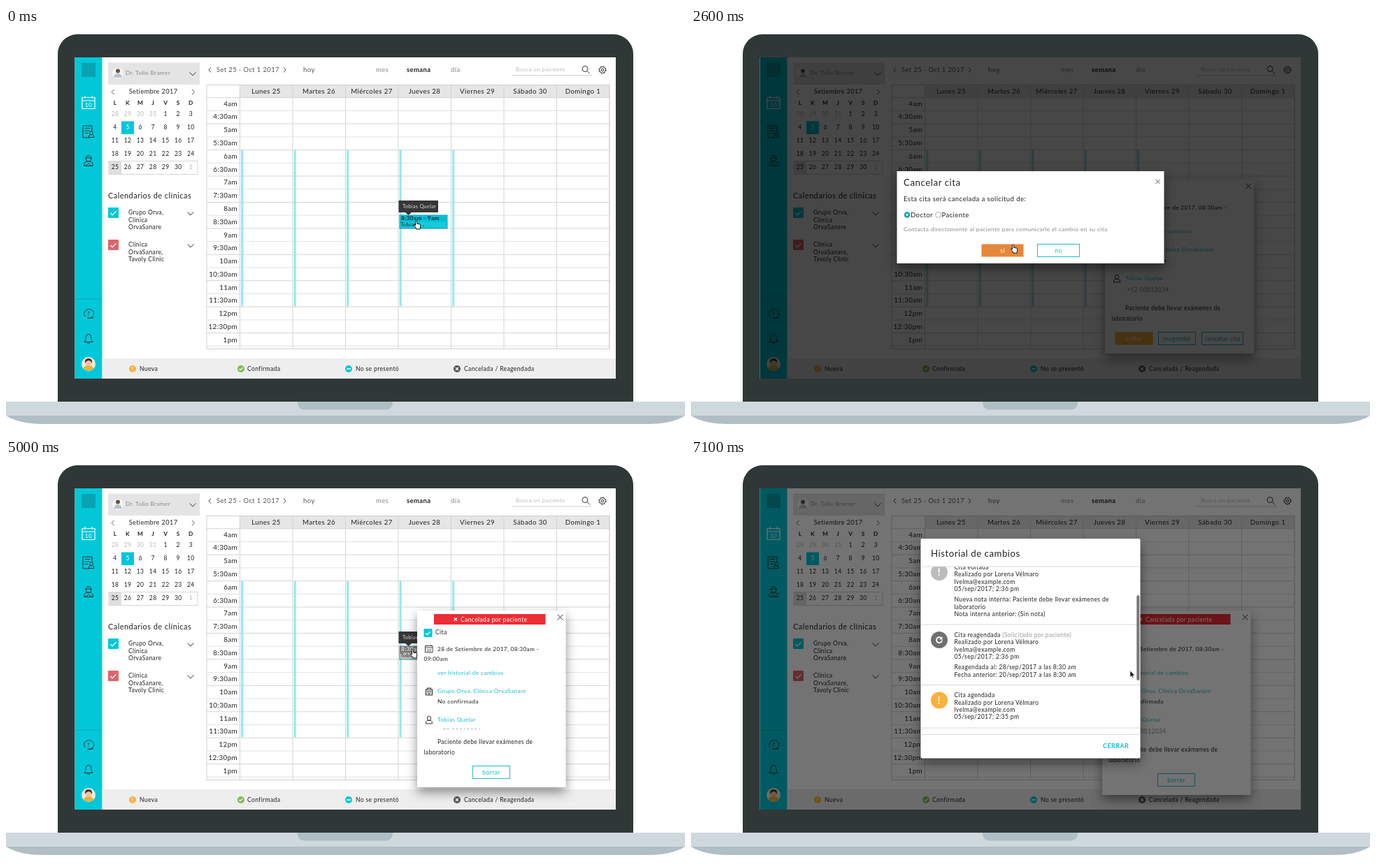
Recreate the animation shown at these times as an HTML page. Size 971x577 px, loop 8.1 s.

```html
<!DOCTYPE html>
<html lang="es">
<head>
<meta charset="utf-8">
<title>Agenda</title>
<style>
html, body { margin: 0; width: 100%; height: 100%; overflow: hidden; background: #fff; }
svg { display: block; width: 100%; height: 100%; }
text { font-family: Lato, "Open Sans", sans-serif; letter-spacing: .04em; fill: #222; white-space: pre; }
.m { text-anchor: middle; }
.e { text-anchor: end; }
.b { font-weight: 700; }
.c { fill: #1cbccb; }
.g { fill: #888; }
.l { fill: #bbb; }
.w { fill: #fff; }
.line { fill: none; stroke: #333; stroke-width: 1; }
.shadow { filter: drop-shadow(0 7px 8px rgba(0,0,0,.44)); }
</style>
</head>
<body>
<svg id="stage" viewBox="0 0 971 577"></svg>
<script>
const TEAL = '#00c8d9', ORANGE = '#fbb03b', DARK = '#333';
const PATIENT = 'Tobias Quelar', PHONE = '+52 00012034';
const STAFF = 'Lorena Vélmaro', MAIL = 'lvelma@example.com';

const text = (x, y, s, size = 8.6, cls = '', more = '') =>
  `<text x="${x}" y="${y}" font-size="${size}" class="${cls}" ${more}>${s}</text>`;
const rect = (x, y, w, h, fill, more = '') =>
  `<rect x="${x}" y="${y}" width="${w}" height="${h}" fill="${fill}" ${more}/>`;
const path = (d, stroke = DARK, width = 1, more = '') =>
  `<path d="${d}" fill="none" stroke="${stroke}" stroke-width="${width}" ${more}/>`;
const shape = (d, fill) => `<path d="${d}" fill="${fill}"/>`;
const disc = (x, y, r, fill, more = '') => `<circle cx="${x}" cy="${y}" r="${r}" fill="${fill}" ${more}/>`;
const group = (id, body, more = '') => `<g id="${id}" ${more}>${body}</g>`;
const range = n => [...Array(n).keys()];

const chevron = (x, y) => path(`M${x - 4.5},${y - 2.5}l4.5,4.5 4.5,-4.5`);
const cross = (x, y, r, stroke = DARK, width = 1) =>
  path(`M${x - r},${y - r}l${2 * r},${2 * r}m0,${-2 * r}l${-2 * r},${2 * r}`, stroke, width);
const tick = (x, y, k, width = 1.3) =>
  path(`M${x - 3 * k},${y}l${2 * k},${2 * k} ${4 * k},${-4 * k}`, '#fff', width);
const check = (x, y, size, fill) =>
  rect(x, y, size, size, fill, 'rx="1"') + tick(x + size / 2, y + size / 2 + .5, size / 11);
const button = (x, y, w, h, label, fill) =>
  rect(x, y, w, h, fill || '#fff', fill ? '' : 'stroke="#1cbccb"') +
  text(x + w / 2, y + h / 2 + 3.2, label, 8.6, fill ? 'm w' : 'm c');
const person = (x, y, s = 1, stroke = DARK) => path(
  `M${x - 3 * s},${y - 2.5 * s}a${3 * s},${3.4 * s} 0 1 1 ${6 * s},0a${3 * s},${3.4 * s} 0 1 1 ${-6 * s},0` +
  `M${x - 5 * s},${y + 6 * s}q0,${-5 * s} ${3 * s},${-5 * s}h${4 * s}q${3 * s},0 ${3 * s},${5 * s}z`, stroke);

function laptop() {
  return shape('M74,535V37A28,28 0 0 1 102,9H869A28,28 0 0 1 897,37V535Z', '#303837') +
    rect(0, 535, 971, 20, '#cfd8dd') +
    shape('M0,555H971Q952,567 918,567H53Q19,567 0,555Z', '#b0bec5') +
    shape('M417,535H553Q553,546.5 542,546.5H428Q417,546.5 417,535Z', '#b0bec5') +
    rect(98.5, 42, 773.5, 460, '#fff');
}

function sidebar() {
  return rect(98.5, 42, 39, 460, TEAL) + rect(108, 50, 20, 20, '#08a2b0') +
    path('M109,99.5h18v16h-18zM109,104h18M113,97v4M123,97v4', '#fff', 1.2) +
    text(118, 113.3, '10', 8, 'm w') +
    path('M119,157h-9v-17h13v7M112.500,143.500h8M112.500,147h7M112.500,150.500h5') + person(122, 152, .75) +
    person(118, 190, 1.25) + path('M113,187q5,-3 10,0M114,197l4,-3 4,3') +
    path('M99,388H137', '#0599a6', 1, 'stroke-dasharray="2 1"') +
    path('M113.500,413.500a7,6.500 0 1 1 3,1.800h8l-2,-2') + text(118, 412, '?', 8, 'm') +
    path('M112,449.500q2,-2 2,-5 0,-6 4,-6t4,6q0,3 2,5zM116,451q2,2 4,0') +
    disc(118, 481, 10, '#f3ead9') + shape('M111,488q1,-5 7,-5t7,5q-7,5 -14,0', '#e8b23a') +
    disc(118, 479.5, 4.5, '#f3c3a0') +
    shape('M113,480q-1,-7 5,-7t5,7q-1,-3 -4,-4 -4,0 -6,4', '#463029');
}

function monthPanel() {
  const colX = i => 156 + 18.05 * i, rowY = r => 126.3 + 18.8 * r;
  let out = rect(146, 49.5, 131, 31.5, '#e4e4e4') + disc(160, 65, 8, '#f4f4f4') +
    disc(160, 61.5, 3, '#6b5548') + shape('M154.500,71q0,-6 5.500,-6t5.500,6z', '#b9c4cb') +
    text(171, 67.3, 'Dr. Tulio Bramer', 8.3, 'g') + chevron(267, 66) +
    path('M154.500,88l-3.500,3.500 3.500,3.500M266,88l3.500,3.500 -3.500,3.500', '#555') +
    text(210.5, 94, 'Setiembre 2017', 9.2, 'm') +
    rect(165, 133.5, 18, 18.5, TEAL) +
    rect(147, 190.5, 127, 19, '#fff', 'stroke="#d5d5d5"') + rect(147, 190.5, 18, 19, '#dedede');
  range(7).forEach(i => out += text(colX(i), 110, 'LKMJVSD'[i], 8.3, 'm b'));
  range(35).forEach(i => {
    const day = i < 4 ? 28 + i : i === 34 ? 1 : i - 3;
    const cls = i < 4 || i === 34 ? 'm l' : day === 5 ? 'm w' : 'm';
    out += text(colX(i % 7), rowY(Math.floor(i / 7)), day, 8.6, cls);
  });
  out += text(146, 244, 'Calendarios de clínicas', 11);
  [['Grupo Orva,', 'Clínica', 'OrvaSanare'], ['Clínica', 'OrvaSanare,', 'Tavoly Clinic']].forEach((lines, i) => {
    const y = 46 * i;
    out += check(146, 257 + y, 15, i ? '#e06469' : TEAL) + chevron(264, 266 + y);
    lines.forEach((s, j) => out += text(175, 267.3 + y + 10.3 * j, s));
  });
  return out;
}

function weekGrid() {
  const colX = i => 334.5 + 75.5 * i, rowY = i => 99.7 + 18.72 * i;
  let out = path('M293,56.500l-3,3.500 3,3.500M397,56.500l3,3.500 -3,3.500', '#444') +
    text(301, 63.2, 'Set 25 - Oct 1 2017', 9.45, '', 'style="fill:#555"') + text(425, 63.2, 'hoy', 9.6, '', 'style="fill:#555"') +
    text(529, 63.2, 'mes', 9.6, 'g') + text(573, 63.2, 'semana', 9.5, 'b') + text(636, 63.2, 'día', 9.6, 'g') +
    text(729, 61.5, 'Busca un paciente', 8.2, 'l') + path('M723,68H838', '#ccc') +
    '<circle class="line" cx="828" cy="58.500" r="4"/>' + path('M831,61.500l4,4') +
    '<circle class="line" cx="853" cy="60" r="4.300"/><circle class="line" cx="853" cy="60" r="1.800"/>' +
    '<circle class="line" cx="853" cy="60" r="5.200" stroke-dasharray="2 2.080"/>' +
    rect(334.5, 81, 528.5, 19, '#e6e6e6');
  ['Lunes 25', 'Martes 26', 'Miércoles 27', 'Jueves 28', 'Viernes 29', 'Sábado 30', 'Domingo 1']
    .forEach((s, i) => out += text(colX(i) + 37.5, 93.5, s, 9.7, 'm'));
  range(20).forEach(i => out += path(`M287,${rowY(i)}H863`, i % 2 ? '#e2e2e2' : '#d4d4d4'));
  range(8).forEach(i => out += path(`M${colX(i)},81V459.500`, '#d4d4d4'));
  out += rect(287, 81.5, 576, 378, 'none', 'stroke="#cfcfcf"');
  range(19).forEach(i => {
    const hour = (4 + Math.floor(i / 2) - 1) % 12 + 1;
    out += text(331, 111.7 + 18.78 * i, hour + (i % 2 ? ':30' : '') + (i < 16 ? 'am' : 'pm'), 9.8, 'e');
  });
  range(5).forEach(i => out += rect(colX(i) + 1.7, 174.5, 3, 224, '#97e7ee'));
  return out;
}

function legend() {
  const y = 488;
  return rect(137.5, 473, 734.5, 29, '#eee') +
    disc(181, y, 5, ORANGE) + text(181, 491, '!', 8, 'm b w') + text(191, 491.2, 'Nueva') +
    disc(336, y, 5, '#7fbb55') + tick(336, y, .8) + text(345, 491.2, 'Confirmada') +
    disc(490, y, 5, TEAL) + path('M487,488h6', '#fff', 1.6) + text(500, 491.2, 'No se presentó') +
    disc(645, y, 5, '#555') + cross(645, y, 2, '#fff', 1.2) + text(655, 491.2, 'Cancelada / Reagendada');
}

function appointment(head, body, ink) {
  return rect(563, 268, 68, 19, body, 'stroke="#087f8b" stroke-width=".8"') +
    rect(563, 268, 68, 9.5, head) +
    text(565, 275.4, '8:30am - 9am', 8.3, 'b', `style="fill:${ink}"`) +
    text(564, 284.3, PATIENT.split(' ')[0], 7.6) + path('M595,285l3,-3M597,285l1,-1', '#345', .7);
}

function tooltip() {
  return rect(561.5, 247, 56.5, 17, '#363636') + shape('M571,264h9l-4.500,4z', '#363636') +
    text(567, 258, PATIENT, 7.4, '', 'style="fill:#ddd"');
}

// Card details share one layout; the top rows start dy lower when a banner is present.
function cardRows(dy, linkId) {
  return `<g transform="translate(0 ${dy})">` + check(9.5, 11, 12, TEAL) + text(26, 19.3, 'Cita') +
    path('M11.500,35.500h10.500v9.500h-10.500zM11.500,38h10.500M14,34v2M19.500,34v2', '#444') + text(16.8, 44, '10', 5.5, 'm') +
    text(29, 43, '28 de Setiembre de 2017, 08:30am -', 8.3) + text(9.5, 57.3, '09:00am', 8.3) +
    text(29, 76.8, 'ver historial de cambios', 8.4, 'c', `id="${linkId}"`) +
    path('M12.500,106v-8h9v8zM14.500,98v-2h5v2M14,100.500h6M14,103h6M17,104v2', '#333', 1.2) +
    text(29, 103.3, 'Grupo Orva, Clínica OrvaSanare', 8.4, 'c') + text(29, 118, 'No confirmada', 8.4) +
    person(17, 141.5, .9) + text(29, 144.3, PATIENT, 8.4, 'c') + '</g>';
}
const note = y => text(29, y, 'Paciente debe llevar exámenes de', 8.5) + text(9.5, y + 14.5, 'laboratorio', 8.5);
const phone = y => text(31, y, PHONE, 8.5, 'g');

function openCard() {
  return rect(0, 0, 213, 249, '#fff', 'class="shadow"') + cross(205, 9.5, 3.8) + cardRows(0, 'link1') +
    phone(161) + note(187) + button(14.5, 218.5, 54, 18, 'editar', ORANGE) +
    button(76.5, 218.5, 53, 18, 'reagendar') + button(138.5, 218.5, 59, 18, 'cancelar cita') +
    group('cancelHover', button(138, 218, 60, 19, 'cancelar cita', '#00b9c9'));
}

function cancelledCard() {
  return rect(0, 0, 212.5, 264, '#fff', 'id="cardBack" class="shadow"') + cross(204.5, 9.5, 3.8) +
    rect(24, 5, 159.5, 15, '#ec2d35') + cross(55, 12.5, 2, '#fff', 1.3) +
    text(62, 15.6, 'Cancelada por paciente', 8.6, 'w') + cardRows(15, 'link2') +
    '<clipPath id="phoneClip"><rect id="phoneBox" x="0" y="166" width="212" height="15"/></clipPath>' +
    `<g clip-path="url(#phoneClip)">${phone(176)}</g>` +
    group('cardFoot', note(202) + button(79.5, 233.5, 53, 18, 'borrar'));
}

function confirmDialog() {
  const ring = x => disc(x, 267.5, 4, '#fff', 'stroke="#999" stroke-width=".8"');
  return rect(294.5, 205, 382, 132, '#fff', 'class="shadow"') +
    text(304, 226, 'Cancelar cita', 13.3) + cross(667.5, 220, 3, '#555') +
    text(304, 248.3, 'Esta cita será cancelada a solicitud de:', 9.65) +
    ring(309) + ring(353.5) +
    group('radio', disc(309, 267.5, 4, '#0aa5c6') + disc(309, 267.5, 1.4, '#fff')) +
    text(314, 270.6, 'Doctor', 9.6) + text(358.5, 270.6, 'Paciente', 9.6) +
    text(304, 290.8, 'Contacta directamente al paciente para comunicarle el cambio en su cita', 8.48, 'g') +
    button(415.5, 309.5, 60, 18, 'sí', '#e5873a') + button(495.5, 309.5, 60, 18, 'no');
}

function historyDialog() {
  const asked = ' <tspan fill="#999">(Solicitado por paciente)</tspan>';
  const entries = [
    { y: 176, fill: '#707070', title: 'Cita cancelada' + asked, time: '2:37', mark: 'x' },
    { y: 237, fill: '#bcbcbc', title: 'Cita editada', time: '2:36', mark: '!',
      extra: ['Nueva nota interna: Paciente debe llevar exámenes de', 'laboratorio', 'Nota interna anterior: (Sin nota)'] },
    { y: 334, fill: '#707070', title: 'Cita reagendada' + asked, time: '2:36', mark: 'o',
      extra: ['Reagendada al: 28/sep/2017 a las 8:30 am', 'Fecha anterior: 20/sep/2017 a las 8:30 am'] },
    { y: 420.5, fill: ORANGE, title: 'Cita agendada', time: '2:35', mark: '!' },
  ];
  let list = '';
  for (const { y, fill, title, time, mark, extra = [] } of entries) {
    list += disc(355, y, 12, fill);
    if (mark === 'x') list += cross(355, y, 3.3, '#fff', 1.8);
    if (mark === '!') list += text(355, y + 5, '!', 15, 'm b w');
    if (mark === 'o') list += path(`M358,${y - 2.5}a4,4 0 1 0 1,3`, '#fff', 1.8) +
      shape(`M359.500,${y - 5}v4.500h-4.500z`, '#fff');
    [title, `Realizado por ${STAFF}`, MAIL, `05/sep/2017; ${time} pm`]
      .forEach((s, i) => list += text(376.5, y - 4.1 + 10.3 * i, s));
    extra.forEach((s, i) => list += text(376.5, y + 42.2 + 10.3 * i, s));
  }
  [215.5, 312, 398.5, 460].forEach(y => list += path(`M328.500,${y}H642.500`, '#d8d8d8'));
  return rect(328.5, 114, 314, 314.5, '#fff', 'rx="2" class="shadow"') + text(343, 140, 'Historial de cambios', 13.2) +
    '<clipPath id="listClip"><rect x="328" y="154" width="315" height="240"/></clipPath>' +
    `<g clip-path="url(#listClip)">${group('list', list)}</g>` +
    path('M328.500,154H642.500M328.500,394.500H642.500', '#d8d8d8') +
    group('thumb', rect(637.3, 156, 4, 122, '#777', 'rx="2"')) +
    text(589, 414.3, 'CERRAR', 9.1, 'b c');
}

const hand = '<path d="M-2.500,-4.800q0,-1.200 1.100,-1.200t1.100,1.200v3l3.500,.5q1.800,.3 1.600,2l-.6,3.300v2h-5.500v-1.200l-3,-3.600q-.6,-1.300 .6,-1.300l1.200,1z" fill="#fff" stroke="#111"/>';
const arrow = '<path d="M0,0v9.500l2.200,-2 1.500,3 1.400,-.7 -1.400,-2.900h3z" fill="#111" stroke="#fff" stroke-width=".6"/>';

const stage = document.getElementById('stage');
stage.innerHTML = laptop() + sidebar() + monthPanel() + weekGrid() + legend() +
  group('booked', appointment('#00bfd2', '#14cbdc', '#123')) +
  group('voided', appointment('#777', '#c4c4c4', '#ddd')) + group('tip', tooltip()) +
  group('card1', openCard(), 'transform="translate(592 217)"') +
  group('card2', cancelledCard(), 'transform="translate(588 217)"') +
  rect(98.5, 42, 773.5, 460, '#000', 'id="dim"') +
  group('confirm', confirmDialog()) + group('history', historyDialog()) +
  group('hand', hand) + group('arrow', arrow, 'transform="translate(628 303)"');

const $ = id => document.getElementById(id);
const set = (id, name, value) => $(id).setAttribute(name, value);
const show = (id, opacity) => {
  $(id).style.display = +opacity ? '' : 'none';
  set(id, 'opacity', +opacity);
};
const smooth = p => p * p * (3 - 2 * p);

// Value of a track of [time, ...values] keys at time t.
function at(t, keys, ease = p => p) {
  const next = keys.findIndex(k => k[0] > t);
  if (next === 0) return keys[0].slice(1);
  if (next < 0) return keys[keys.length - 1].slice(1);
  const a = keys[next - 1], b = keys[next], p = ease((t - a[0]) / (b[0] - a[0]));
  return a.slice(1).map((v, i) => v + (b[i + 1] - v) * p);
}

const tracks = {
  card1: [[400, 0], [500, .3], [600, .7], [700, 1], [4200, 1], [4300, .5], [4400, 0]],
  card2: [[4600, 0], [4700, .35], [4800, .75], [4900, 1]],
  dim: [[2000, 0], [2100, .37], [2200, .55], [2300, .72], [4200, .72], [4300, .4], [4400, 0], [6200, 0], [6300, .55]],
  confirm: [[2000, 0], [2100, .55], [2200, .8], [2300, 1], [4200, 1], [4300, .4], [4400, 0]],
};
const pointer = [[1000, 588, 282], [1500, 762, 445.5], [2200, 762, 445.5], [2800, 357, 271], [3100, 357, 271],
  [3700, 432, 322.5], [4300, 432, 322.5], [4600, 583, 279], [5200, 583, 279], [5700, 629, 309]];
const phoneHeight = [[4900, 0], [5000, 4], [5100, 9], [5200, 15]];
const scroll = [[6300, 0], [7100, 75]];

function render(t) {
  for (const id in tracks) show(id, at(t, tracks[id])[0]);
  show('booked', t < 4500);
  show('voided', t >= 4500);
  show('tip', t < 1200 || (t >= 4600 && t < 5300));
  show('cancelHover', t >= 1500 && t < 2300);
  set('radio', 'transform', `translate(${t < 3000 ? 0 : 44.5} 0)`);

  const height = at(t, phoneHeight)[0];
  set('phoneBox', 'height', height);
  set('cardBack', 'height', 249 + height);
  set('cardFoot', 'transform', `translate(0 ${height - 15})`);
  $('link2').style.textDecoration = t >= 5600 && t < 6400 ? 'underline' : 'none';

  const offset = at(t, scroll, smooth)[0];
  show('history', t >= 6300);
  set('list', 'transform', `translate(0 ${-offset})`);
  set('thumb', 'transform', `translate(0 ${offset * .52})`);
  show('thumb', t >= 6400);

  set('hand', 'transform', `translate(${at(t, pointer, smooth).join(' ')})`);
  show('hand', t < 6400);
  show('arrow', t >= 6400);
}

const LOOP = 8100, STEP = 100;
const start = performance.now();
let last = -1;
function tickFrame() {
  const t = Math.floor((performance.now() - start) % LOOP / STEP) * STEP;
  if (t !== last) render(last = t);
  requestAnimationFrame(tickFrame);
}
tickFrame();
</script>
</body>
</html>
```
